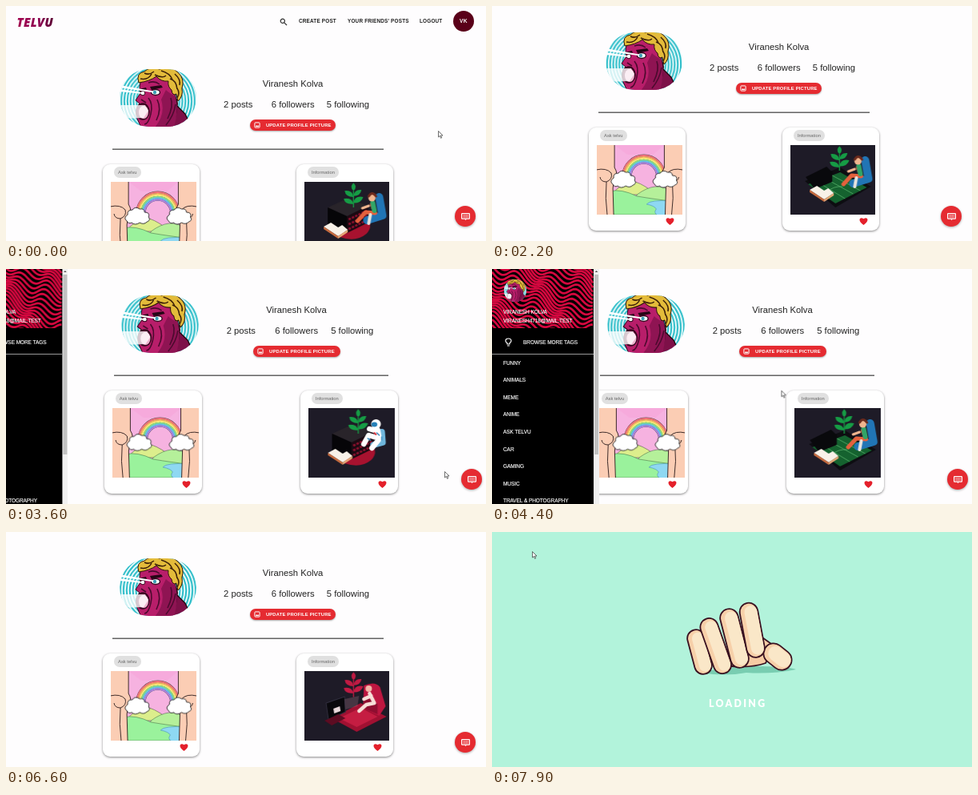
Recreate the animation shown at these times as an HTML page. Size 600 px wide and 294 px high, loop 8 s.

```html
<!DOCTYPE html>
<html lang="en">
<head>
<meta charset="utf-8">
<title>Profile page</title>
<style>
html, body { margin: 0; width: 100%; height: 100%; overflow: hidden; background: #fefdfe; }
body { position: relative; font-family: "Liberation Sans", Arial, sans-serif; color: #222; }
.a, .t { position: absolute; }
.t { line-height: 20px; white-space: nowrap; }
svg { position: absolute; overflow: visible; }
svg.clip { overflow: hidden; }

/* the page gets 8px wider while the drawer hides the scrollbar */
.page { position: absolute; left: 0; top: 0; height: 294px; width: 592px; animation: widen 8s step-end infinite; }
@keyframes widen { 0% { width: 592px } 44.3% { width: 600px } 76.2%, 100% { width: 592px } }
.scroll { position: absolute; inset: 0; animation: scroll 8s infinite; }
@keyframes scroll {
  0%, 21.25% { transform: none; animation-timing-function: ease-in-out }
  25%, 83.75% { transform: translateY(-46px); animation-timing-function: ease-in-out }
  87.5%, 100% { transform: none }
}

.logo { left: 13.5px; top: 9.5px; font: italic 800 15px/20px "Open Sans", sans-serif; letter-spacing: .3px;
  background: linear-gradient(90deg, #a3054f, #8c0050 60%, #5c0034); -webkit-background-clip: text; background-clip: text; color: transparent; }
.nav { top: 9px; font-size: 6.4px; font-weight: bold; letter-spacing: .18px; }
.user { left: 559px; top: 6px; width: 26px; height: 26px; border-radius: 50%; background: #5a0019;
  color: #fff; font: bold 6.6px/26px "Liberation Sans", sans-serif; text-align: center; letter-spacing: .3px; }
.big { font-size: 11.25px; }
.face { left: 24%; top: 79px; width: 16.2%; height: 72px; border-radius: 36px; overflow: hidden; }
.face svg { width: 100%; height: 100%; }
.btn { left: 51.5%; top: 141.5px; width: 18.1%; height: 14.5px; border-radius: 8px; background: #e52b31; box-shadow: 0 1px 2px #0005; }
.btn .t { left: 20px; top: -3px; color: #fff; font-size: 5.9px; font-weight: bold; letter-spacing: .15px; }
.rule { left: 22.45%; width: 57.3%; top: 178px; height: 2px; background: linear-gradient(#aaa 50%, #666 50%); }
.card { top: 198px; width: 20.45%; height: 128.5px; border-radius: 9px; background: #fff; box-shadow: 0 1px 3px #0007; }
.chip { left: 14px; top: 2.5px; height: 14px; padding: 0 5px; border-radius: 7px; background: #e0e0e0; color: #666;
  font-size: 5.8px; line-height: 14px; white-space: nowrap; }
.pic { left: 8.3%; top: 21.5px; width: 88%; height: 87px; }
.heart { right: 14.3px; top: 111.5px; }
.fab { right: 5px; top: 250px; width: 26px; height: 26px; border-radius: 50%; background: #e52b31; box-shadow: 0 1px 3px #0005; }

.drawer { left: 0; top: 0; width: 134px; height: 294px; background: #000; color: #fff; font-size: 6.5px; letter-spacing: -.07px;
  overflow: hidden; animation: slide 8s infinite; }
.drawer .t { left: 14px; -webkit-text-stroke: .15px #fff; }
@keyframes slide {
  0%, 44.3% { transform: translateX(-136px); animation-timing-function: cubic-bezier(0, 0, .2, 1) }
  47.1%, 73.75% { transform: none; animation-timing-function: cubic-bezier(.4, 0, .6, 1) }
  76.2%, 100% { transform: translateX(-136px) }
}
.bar { left: 127px; top: 0; width: 7px; height: 294px; background: #f1f1f1; }
.thumb { left: 1px; top: 7px; width: 5px; height: 225px; background: #c1c1c1; }

.rings { transform-origin: 48px 40px; animation: rings 1s linear infinite; }
@keyframes rings { to { transform: scale(1.04) } }
.bob { animation: bob 1s ease-in-out infinite alternate; }
@keyframes bob { to { transform: translateY(1px) } }

/* layers of the room picture, cut over a 2s cycle */
.cube, .guy, .astro, .field, .leafy, .lounge { animation: 2s step-end infinite; }
.cube { animation-name: cube } .guy { animation-name: guy } .astro { animation-name: astro }
.field { animation-name: field } .leafy { animation-name: leafy } .lounge { animation-name: lounge }
@keyframes cube { 0% { opacity: 1 } 5% { opacity: 0 } 50%, 100% { opacity: 1 } }
@keyframes guy { 0% { opacity: 1 } 22.5% { opacity: 0 } 92.5%, 100% { opacity: 1 } }
@keyframes astro { 0% { opacity: 0 } 50% { opacity: 1 } 92.5%, 100% { opacity: 0 } }
@keyframes field { 0% { opacity: 0 } 5% { opacity: 1 } 22.5%, 100% { opacity: 0 } }
@keyframes leafy { 0% { opacity: 1 } 22.5% { opacity: 0 } 50%, 100% { opacity: 1 } }
@keyframes lounge { 0% { opacity: 0 } 22.5% { opacity: 1 } 50%, 100% { opacity: 0 } }

.loading { inset: 0; background: #b2f3db; opacity: 0; animation: load 8s step-end infinite; }
@keyframes load { 0% { opacity: 0 } 92.5%, 100% { opacity: 1 } }
.loading .t { left: 271px; top: 204.5px; color: #fff; font: 900 12.3px/20px Lato, sans-serif; letter-spacing: 2.3px; }
.finger { animation: drum .8s ease-in-out infinite; transform-box: fill-box; transform-origin: 70% 90%; }
@keyframes drum { 0%, 62%, 100% { transform: none } 25% { transform: translateY(-6px) rotate(7deg) } }

.cursor { left: 0; top: 0; width: 7px; height: 10px; animation: move 8s ease-in-out infinite; }
@keyframes move {
  0%, 3% { transform: translate(540px, 156px) }
  9% { transform: translate(604px, 120px) }
  33% { transform: translate(604px, 240px) }
  40%, 43% { transform: translate(571px, 260px) }
  45%, 48% { transform: translate(548px, 253px) }
  62%, 75% { transform: translate(176px, 51px); opacity: 1 }
  78%, 84% { transform: translate(176px, 51px); opacity: 0 }
  86% { transform: translate(150px, 48px); opacity: 1 }
  91%, 100% { transform: translate(50px, 24px) }
}
</style>
</head>
<body>
<svg width="0" height="0">
  <defs>
    <path id="heart" d="M5.5 10 C-3 4 1 -1 5.5 2.2 C10 -1 14 4 5.5 10z" fill="#e4202b"/>
    <g id="plant" transform="translate(-6 -2) scale(1.1)">
      <path d="M61 31V12" stroke="currentColor" stroke-width="1.2"/>
      <path d="M61 27q-10 1-11-6q9-2 11 6zm0-1q9 0 11-7q-10-2-11 7zm0-7q-9 0-10-7q9-1 10 7zm0-1q8 0 9-7q-8-1-9 7zm0-6q-5-4 0-9q5 5 0 9z" fill="currentColor"/>
    </g>
    <g id="portrait" stroke-linejoin="round">
      <path d="M0 0h96v72H0z" fill="#f1fcfc"/>
      <g id="rings" class="rings" fill="none" stroke="#2bbcc8" stroke-width="2"/>
      <path d="M62 30Q74 34 72 46L82 56 90 73H50z" fill="#7d1048" stroke="#24060f" stroke-width="1.4"/>
      <path d="M29 10Q23 20 26 30L20 39 25 43Q18 50 22 62L27 73H66Q74 54 70 34L68 14Q48 4 29 10z" fill="#b81e6a" stroke="#34081f"/>
      <path d="M52 38Q58 56 44 73H68Q74 54 70 34 62 30 58 26z" fill="#8f1453"/>
      <path d="M27 38l6 4M36 36q6 7 3 20t-8 13M47 38q6 12-1 26M64 36q4 10-4 26M70 44q-2 14-12 26M36 17q8-3 14 2" fill="none" stroke="#4c0a2e" stroke-width="1.6"/>
      <path d="M24 17Q20 5 31 3 38-4 50 0 64-5 73 4 82 12 78 24 80 34 73 40L71 31Q66 34 65 26 60 22 61 15 52 16 46 9 38 15 24 17z" fill="#e3bb3a" stroke="#2b1408"/>
      <path d="M26 12q10 2 14-6M31 5q6 3 12-2M44 7q10 5 14 1M52 2q11 3 14 11M63 12q8 2 9 13M69 6q8 7 6 14M72 24q4 6 0 12" fill="none" stroke="#3d2108" stroke-width="1.5"/>
      <path d="M24 25l9-2 1 2.5-9 2zm14-3l14-2 2 3-14 3z" fill="#260616"/>
      <ellipse cx="45" cy="29" rx="5.5" ry="3.5" fill="#fff" stroke="#34081f" stroke-width="1.4"/>
      <circle cx="44" cy="29" r="2.2" fill="#3a9fb5"/>
      <ellipse cx="29" cy="30" rx="2.8" ry="2.8" fill="#fff" stroke="#34081f"/>
      <ellipse cx="29" cy="53" rx="8" ry="10" fill="#5d0b33" stroke="#34081f" stroke-width="1.5"/>
      <ellipse cx="30" cy="54" rx="6" ry="8" fill="#eeb4cf"/>
      <path d="M0 20L42 27.5v1.8L0 23zM0 25L30 29.5v1.6L0 28z" fill="#fff"/>
      <path d="M0 45L32 45 36 52 30 61 0 62z" fill="#fff" opacity=".78"/>
    </g>
    <g id="cloud" fill="#fff" stroke="#222" stroke-width=".9">
      <path d="M-13 7Q-18 3-12-1-13-7-6-7-3-12 3-8 9-9 9-4 16-4 14 2 17 6 12 8 8 12 3 9-3 13-7 9-11 11-13 7z"/>
    </g>
  </defs>
</svg>

<div class="page">
  <div class="scroll">
    <div class="t logo">TELVU</div>
    <svg style="left:342px;top:14.5px" width="10" height="10" fill="none" stroke="#333" stroke-width="1.2"><circle cx="3.8" cy="3.8" r="2.6"/><path d="M5.8 5.8L9 9"/></svg>
    <div class="t nav" style="left:366px">CREATE POST</div>
    <div class="t nav" style="left:427px">YOUR FRIENDS' POSTS</div>
    <div class="t nav" style="left:517px">LOGOUT</div>
    <div class="a user">VK</div>

    <div class="a face"><svg viewBox="0 0 96 72" preserveAspectRatio="none"><use href="#portrait"/></svg></div>
    <div class="t big" style="left:54.2%;top:87px">Viranesh Kolva</div>
    <div class="t big" style="left:45.95%;top:112.5px">2 posts</div>
    <div class="t big" style="left:56.05%;top:112.5px">6 followers</div>
    <div class="t big" style="left:67.7%;top:112.5px">5 following</div>
    <div class="a btn">
      <svg style="left:5px;top:3.5px" width="8" height="8"><rect x=".9" y=".9" width="6.2" height="6.2" rx=".8" fill="none" stroke="#fff"/><path d="M1.8 6l1.4-2 1.1 1.2L5.2 4 6.4 6z" fill="#fff"/></svg>
      <div class="t">UPDATE PROFILE PICTURE</div>
    </div>
    <div class="a rule"></div>

    <div class="a card" style="left:20.45%">
      <div class="a chip">Ask telvu</div>
      <svg class="clip pic" viewBox="0 0 106 87" preserveAspectRatio="none">
        <path d="M0 0h106v87H0z" fill="#f6b2e0"/>
        <path d="M22 0h62L70 12H38z" fill="#f7a3da" opacity=".5"/>
        <path d="M18 62Q34 44 48 46 60 50 74 62z" fill="#dcee8c" stroke="#555" stroke-width=".6"/>
        <path d="M50 62Q74 44 92 58V87H40z" fill="#b5f09a" stroke="#4d7a4d" stroke-width=".6"/>
        <path d="M16 58Q30 54 50 64 74 68 92 70V87H16z" fill="#9af29c" stroke="#4d7a4d" stroke-width=".6"/>
        <path d="M94 70Q66 68 62 74 72 76 74 80 70 85 76 88H98z" fill="#8ed8f2" stroke="#4b93b0" stroke-width=".6"/>
        <g id="bow" fill="none"></g>
        <g fill="#fbcdb4" stroke="#2b1b1b" stroke-width=".9">
          <path id="hand" d="M-1-1H22V28Q27 36 23 43 20 48 20 54L21 88H-1z"/>
          <use href="#hand" transform="matrix(-1 0 0 1 106 0)"/>
          <path id="thumb" d="M-1 31Q12 28 18 35 20 43 12 46 5 46 4 40M12 46Q10 66 13 88" fill="none"/>
          <use href="#thumb" transform="matrix(-1 0 0 1 106 0)"/>
        </g>
        <g class="bob"><use href="#cloud" x="33" y="42"/><use href="#cloud" x="85" y="42"/></g>
      </svg>
      <svg class="heart" width="11" height="11"><use href="#heart"/></svg>
    </div>

    <div class="a card" style="left:61.3%">
      <div class="a chip">Information</div>
      <svg class="clip pic" viewBox="0 0 106 87" preserveAspectRatio="none">
        <path d="M0 0h106v87H0z" fill="#1e1b27"/>
        <g class="cube">
          <path d="M44 62L78 46Q86 56 77 65 64 76 44 69z" fill="#a8122f"/>
          <path d="M29 32L55 20 79 30 53 43z" fill="#29242a"/>
          <path d="M29 32L53 43V64L29 53z" fill="#060508"/>
          <path d="M53 43L79 30V51L53 64z" fill="#1c0a12"/>
          <path d="M55 47L78 36M55 53L78 42M55 59L78 48" stroke="#8d112e" stroke-width="2.6" stroke-dasharray="3 1.5"/>
        </g>
        <g class="field">
          <path d="M18 45L62 28 100 52 56 78z" fill="#0d0d11"/>
          <path d="M22 49L62 34 95 53 56 73z" fill="#15622f"/>
          <path d="M32 45L68 67M42 41L78 61M52 38L87 57M46 58q8-7 19-6" fill="none" stroke="#57b06a" stroke-width=".8"/>
          <path d="M19 40L45 27 52 34V46L30 55z" fill="#09090c"/>
        </g>
        <g class="leafy">
          <use href="#plant" color="#169c45"/>
          <path d="M24 56L33 51 42 57 47 54 54 60 42 68z" fill="#f8f1e8"/>
          <path d="M24 56L42 68V71L24 59z" fill="#c86c3f"/>
          <path d="M42 68L54 60V63L42 71z" fill="#e6a877"/>
        </g>
        <g class="astro" stroke-linecap="round" stroke-linejoin="round" fill="none">
          <path d="M90 30L91 43 80 46" stroke="#6fb6dc" stroke-width="8"/>
          <path d="M85 27L87 38 74 34 68 45M84 29L75 26M86 40L78 50" stroke="#fff" stroke-width="6.5"/>
          <circle cx="83" cy="20" r="6" fill="#fff"/>
          <ellipse cx="81" cy="20.5" rx="3.6" ry="3" fill="#2680b8"/>
          <path d="M84 31l3 3M73 38l3 2M90 36v4" stroke="#3d8fc0" stroke-width="1.6"/>
          <path d="M81 31l2 2" stroke="#e3434b" stroke-width="2"/>
        </g>
        <g class="guy" stroke-linecap="round" stroke-linejoin="round" fill="none">
          <path d="M93 19L97 42 78 48" stroke="#2175b5" stroke-width="10"/>
          <path d="M84 28L88 39 76 38 66 49" stroke="#e5613d" stroke-width="5"/>
          <path d="M82 41L80 52" stroke="#e9e5de" stroke-width="4"/>
          <path d="M85 26L87 36" stroke="#31a568" stroke-width="6"/>
          <path d="M80 30L72 33" stroke="#f0b58f" stroke-width="3"/>
          <circle cx="84" cy="20" r="4.5" fill="#f0b58f"/>
          <path d="M80 18q4-7 9 0" stroke="#6b2a1d" stroke-width="3"/>
        </g>
        <g class="lounge" stroke-linecap="round" stroke-linejoin="round">
          <path d="M34 59L70 40 102 57 65 76z" fill="#a01132"/>
          <path d="M43 59L70 46 91 57 65 70z" fill="#c51d42"/>
          <use href="#plant" color="#c01b43"/>
          <path d="M74 18Q88 12 94 20L101 44 93 56 73 46z" fill="#bd1740"/>
          <path d="M75 32L91 41V54L73 46z" fill="#8f0e30"/>
          <path d="M81 28L87 40 77 42 68 50M83 31L74 35" fill="none" stroke="#f7dfd8" stroke-width="4.4"/>
          <circle cx="80" cy="22" r="4" fill="#f3b7a8"/>
          <path d="M27 40L50 32 51 51 30 61z" fill="#09080c" stroke="#333040"/>
          <path d="M36 47l8-3 1 6-8 3z" fill="#e9d9dc"/>
          <path d="M25 62l17-8 9 5-17 9z" fill="#5c0c22"/>
          <path d="M50 35L68 31 66 44 51 48z" fill="#e8a7b4" opacity=".2"/>
        </g>
      </svg>
      <svg class="heart" width="11" height="11"><use href="#heart"/></svg>
    </div>
  </div>
  <div class="a fab"><svg style="left:7.5px;top:8.5px" width="11" height="10" fill="none" stroke="#fff"><rect x=".6" y=".6" width="9.8" height="6.6" rx=".6" stroke-width="1.2"/><path d="M2.3 3h6.6M2.3 5h6.6" stroke-dasharray="1.4 .4" stroke-width=".9"/><path d="M4 7.5h3L5.5 9z" fill="#fff" stroke="none"/></svg></div>
</div>

<div class="a drawer" id="drawer">
  <svg class="clip" style="left:0;top:0" width="127" height="74"><g id="waves" fill="none" stroke="#d5083f" stroke-width="2.7"/></svg>
  <div class="a" style="left:14.5px;top:12.5px;width:28.5px;height:28.5px;border-radius:50%;overflow:hidden"><svg width="28.5" height="28.5" viewBox="0 0 96 72" preserveAspectRatio="xMidYMid slice"><use href="#portrait"/></svg></div>
  <div class="t" style="top:44px">VIRANESH KOLVA</div>
  <div class="t" style="top:54.5px">VIRANESH4718@MAIL.TEST</div>
  <svg style="left:15.5px;top:86px" width="9" height="12" fill="none" stroke="#fff" stroke-width="1.2"><path d="M3 8V6.6Q1 5.6 1 3.9 1 1 4.5 1T8 3.9Q8 5.6 6 6.6V8zM3 10h3"/></svg>
  <div class="t" style="left:39px;top:81.5px">BROWSE MORE TAGS</div>
  <div class="a" style="left:0;top:106px;width:127px;height:1px;background:#999"></div>
  <div class="a bar"><div class="a thumb"></div><svg width="7" height="6"><path d="M1.7 4L3.5 2 5.3 4z" fill="#505050"/></svg></div>
</div>

<div class="a loading">
  <svg width="600" height="294">
    <path d="M262 176Q290 168 330 168T380 172Q350 178 318 176 290 181 262 176z" fill="#79cdb1"/>
    <path d="M268 160L338 132 352 142 342 164Q325 170 300 168z" fill="#f6cba4" stroke="#381020" stroke-width="1.8"/>
    <g id="hands" stroke-linecap="round"></g>
  </svg>
  <div class="t">LOADING</div>
</div>

<svg class="cursor" viewBox="0 0 7 10"><path d="M.5.5V8L2.3 6.4 3.5 9.3 4.7 8.8 3.5 6H6z" fill="#fff" stroke="#333" stroke-width=".7"/></svg>

<script>
const $ = id => document.getElementById(id);
const range = n => [...Array(n).keys()];

$('rings').innerHTML = range(16).map(i => `<circle cx="48" cy="40" r="${4 + i * 3.8}"/>`).join('');

// rainbow from the outside in, with dark edges
const arc = (r, color, w) => `<path d="M${58.5 - r} 44V39A${r} ${r} 0 0 1 ${58.5 + r} 39V44" stroke="${color}" stroke-width="${w}"/>`;
$('bow').innerHTML = arc(21.3, '#555', 12.2) +
  ['#f5707c', '#f9b060', '#f8ec78', '#84e08a', '#68bdf2', '#b084e2'].map((c, i) => arc(26 - i * 1.9, c, 2)).join('');

// wavy banner stripes
$('waves').innerHTML = range(32).map(i => {
  const pts = range(64).map(k => {
    const x = k * 2;
    const y = i * 5.4 - 80 + x * .5 + 4.5 * Math.sin(x / 5.5 + i * .4) + 4 * Math.sin(x / 15 - i * .3);
    return x + ' ' + y.toFixed(1);
  });
  return `<path d="M${pts.join('L')}"/>`;
}).join('');

['FUNNY', 'ANIMALS', 'MEME', 'ANIME', 'ASK TELVU', 'CAR', 'GAMING', 'MUSIC', 'TRAVEL &amp; PHOTOGRAPHY'].forEach((tag, i) =>
  $('drawer').insertAdjacentHTML('beforeend', `<div class="t" style="top:${107.5 + i * 21.6}px">${tag}</div>`));

// a finger is a round-ended stroke: outline, shade, light
const finger = ([x1, y1, x2, y2, w], i) => {
  const line = (dx, color, width) => `<path d="M${x1 + dx} ${y1}L${x2 + dx} ${y2}" stroke="${color}" stroke-width="${width}"/>`;
  const lift = i ? `class="finger" style="animation-delay:${-.8 + (i - 1) * .06}s"` : '';
  return `<g ${lift}>${line(0, '#381020', w)}${line(0, '#f7d0a9', w - 3.6)}${line(2.4, '#fae7c8', w - 8.6)}</g>`;
};
$('hands').innerHTML = [
  [352, 152, 362, 160, 27], [255, 133, 264, 167, 23.5], [271.5, 119, 288, 166, 24],
  [296.5, 107.5, 309.5, 158.5, 24.5], [321, 100, 329.5, 145.5, 24.5]
].map(finger).join('');
</script>
</body>
</html>
```
